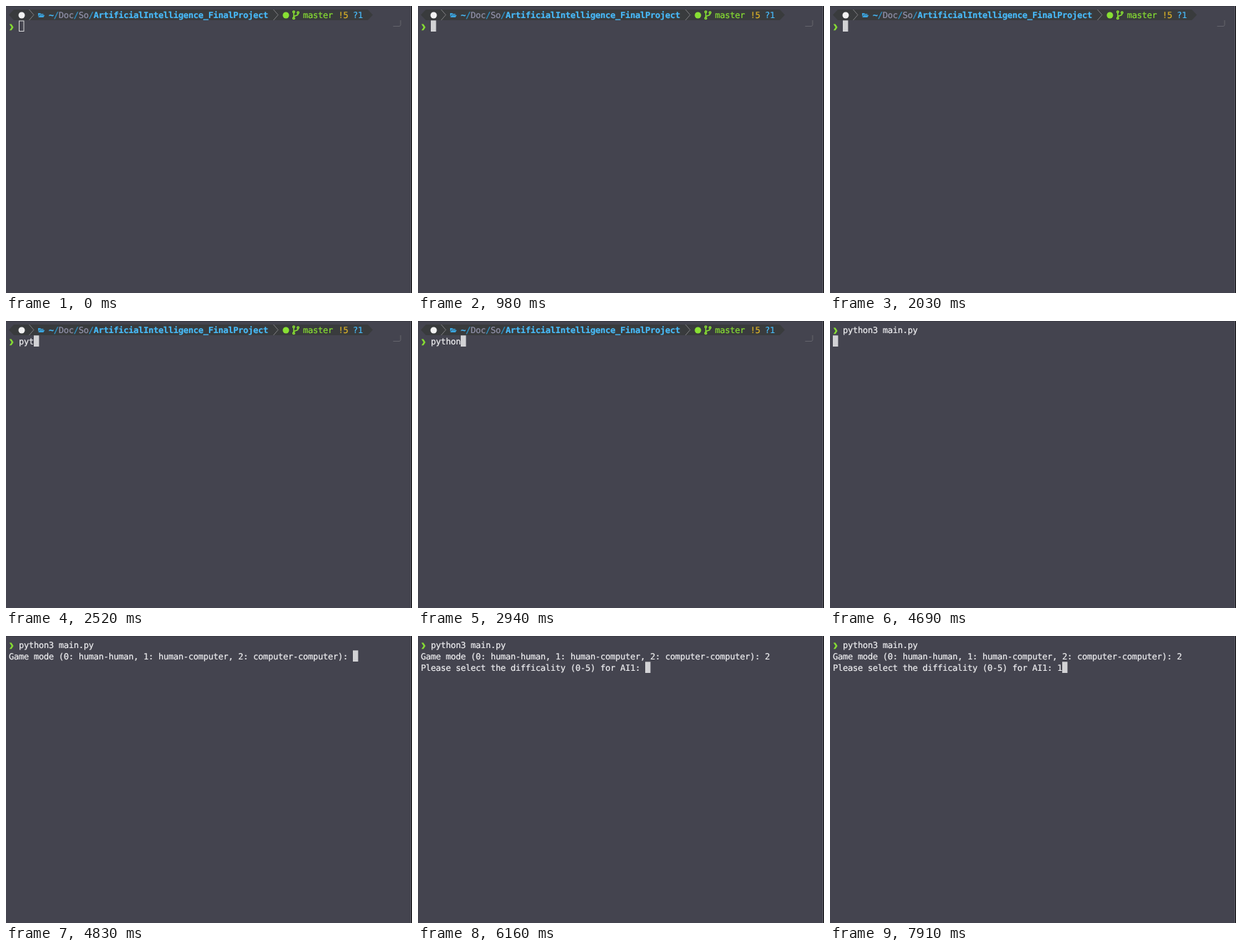
Recreate the animation shown at these times as an HTML page. Size 570 px wide and 404 px high, loop 8000 ms.

```html
<!DOCTYPE html>
<html lang="en">
<head>
<meta charset="utf-8">
<title>Terminal session</title>
<style>
  html, body { margin: 0; width: 100%; height: 100%; overflow: hidden; background: #44444f; }
  svg { display: block; width: 570px; height: 404px; }
  text {
    font: 12px "DejaVu Sans Mono", monospace;
    letter-spacing: -0.224px; /* 7px cells */
    white-space: pre;
    color: #f0f0f2;
    fill: currentColor;
    stroke: currentColor;
    stroke-width: 0.2px;
    text-rendering: geometricPrecision;
  }
  .bold { font-weight: bold; }
  .blue { color: #48bcfb; fill: currentColor; stroke: currentColor; }
  .slash { color: #2f98ce; fill: currentColor; stroke: currentColor; }
  .dim { color: #9292aa; fill: currentColor; stroke: currentColor; }
  .green { color: #88e033; }
  .yellow { color: #deb428; }
  .prompt { font-size: 11px; stroke-width: 0.9px; }
  .line { fill: none; stroke: #7d7d80; }
</style>
</head>
<body>
<svg viewBox="0 0 570 404">
  <rect width="570" height="404" fill="#44444f"/>
  <path d="M0 .5H569" stroke="#393942"/>
  <path d="M568.5 0V404" stroke="#5b5b64"/>
  <path d="M569.5 0V404" stroke="#08080a"/>

  <g id="bar">
    <path d="M4 12.5L11 5H508L515 12.5L508 20H11Z" fill="#393b3d"/>
    <circle cx="22" cy="13" r="4.5" fill="#f2f2f2"/>
    <path class="line" d="M32.5 5L39 12.5L32.5 20M375.5 5L382 12.5L375.5 20"/>
    <path d="M45 10H48.2L49 11H52.5V12.2H47L45 15ZM47.3 12.8H54.5L52.5 16H45.3Z" fill="#3ba3dc"/>
    <text x="60" y="17"><tspan class="blue bold">~</tspan><tspan class="slash">/</tspan><tspan class="dim">Doc</tspan><tspan class="slash">/</tspan><tspan class="dim">So</tspan><tspan class="slash">/</tspan><tspan class="blue bold">ArtificialIntelligence_FinalProject</tspan></text>
    <circle cx="393" cy="13" r="4.5" fill="#88e033"/>
    <g fill="none" stroke="#88e033" stroke-width="1.5">
      <path d="M404 9V17M410 10V11Q410 13 407.5 13.3L404 14.8"/>
      <circle cx="404" cy="8.2" r="1.3"/>
      <circle cx="404" cy="17.3" r="1.3"/>
      <circle cx="410" cy="9.2" r="1.3"/>
    </g>
    <text x="417" y="17" class="green">master</text>
    <text x="466.5" y="17" class="yellow">!5</text>
    <text x="487" y="17" class="blue">?1</text>
    <path class="line" d="M543.5 28.5H552Q554 28.5 554 26.5V20" style="stroke:#64646c"/>
  </g>

  <g id="command">
    <text x="4.5" y="17" class="green bold prompt">❯</text>
    <text id="typed" x="18" y="17"></text>
  </g>
  <text id="mode" x="4" y="33"></text>
  <text id="level" x="4" y="49"></text>
  <rect id="cursor"/>
</svg>
<script>
  const LOOP = 8000, CELL = 7, ROW = 16, LEFT = 4;
  const FOCUS = 70, ENTER = 4690, MODE = 4830, MODE_KEY = 5880, LEVEL = 6160, LEVEL_KEY = 7910;
  const COMMAND = "python3 main.py";
  const KEY_TIMES = [2100, 2240, 2380, 2590, 2730, 2870, 3010, 3220, 3360, 3430, 3500, 3640, 3780, 3920, 4410];
  const MODE_TEXT = "Game mode (0: human-human, 1: human-computer, 2: computer-computer): ";
  const LEVEL_TEXT = "Please select the difficality (0-5) for AI1: ";

  const el = Object.fromEntries(["bar", "command", "typed", "mode", "level", "cursor"]
    .map(id => [id, document.getElementById(id)]));

  const setText = (node, value) => { if (node.textContent !== value) node.textContent = value; };
  const setAttrs = (node, attrs) => {
    for (const key in attrs) node.setAttribute(key, attrs[key]);
  };

  // Answer line: hidden, then the question, then the question with its reply.
  const answer = (t, shown, keyed, question, reply) =>
    t < shown ? "" : question + (t < keyed ? "" : reply);

  function placeCursor(column, row, focused) {
    const x = LEFT + column * CELL, y = LEFT + row * ROW;
    setAttrs(el.cursor, focused
      ? { x, y: y + 0.3, width: CELL + 0.4, height: ROW - 0.3, fill: "#d2d2d5", stroke: "none" }
      : { x: x + 0.5, y: y + 1, width: CELL - 0.5, height: ROW - 1.5, fill: "none", stroke: "#d8d8da" });
  }

  function render(t) {
    const entered = t >= ENTER;
    const typed = COMMAND.slice(0, KEY_TIMES.filter(time => time <= t).length);
    const mode = answer(t, MODE, MODE_KEY, MODE_TEXT, "2");
    const level = answer(t, LEVEL, LEVEL_KEY, LEVEL_TEXT, "1");

    el.bar.style.display = entered ? "none" : "";
    setAttrs(el.command, { transform: `translate(0 ${entered ? 0 : ROW})` });
    setText(el.typed, typed);
    setText(el.mode, mode);
    setText(el.level, level);

    const column = !entered ? typed.length + 2 : (level || mode).length;
    placeCursor(column, level ? 2 : 1, t >= FOCUS);
  }

  const start = performance.now();
  function tick() {
    render((performance.now() - start) % LOOP);
    requestAnimationFrame(tick);
  }
  tick();
</script>
</body>
</html>
```
